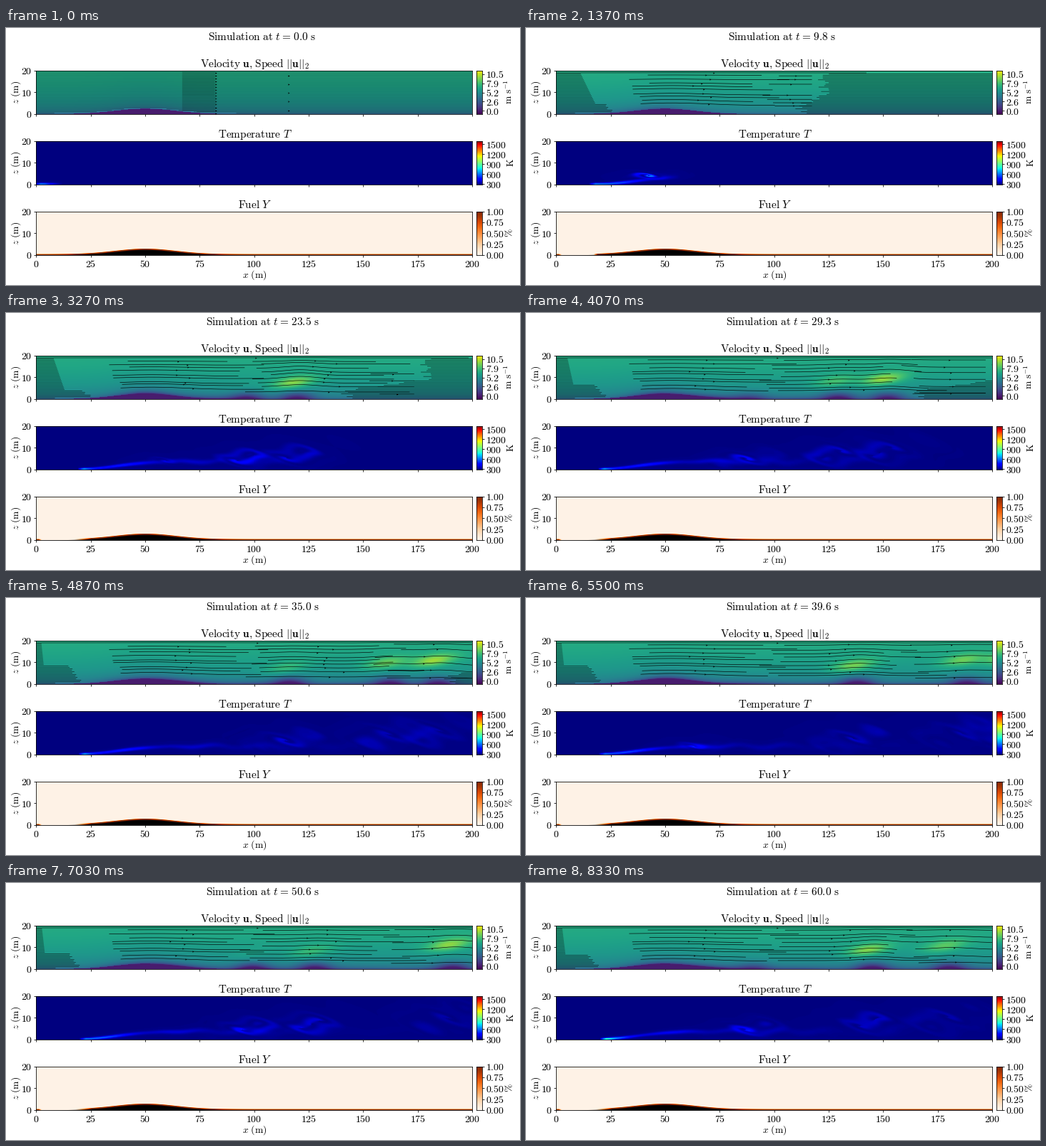
Write a matplotlib script that moves like this. It is 720 by 361 pixels and loops after 8370 ms.

```python
import matplotlib.pyplot as plt
import numpy as np
from matplotlib.animation import FuncAnimation

W, H = 720, 361
PX = 0.72                      # points per pixel at 100 dpi
STEP, FRAMES = 30, 279
PANEL_TOPS = (59.6, 158.6, 257.7)
PANEL_H = 61.1

plt.rcParams["mathtext.fontset"] = "cm"
fig = plt.figure(figsize=(7.2, 3.61), dpi=100, facecolor="white")

x = np.linspace(0, 200, 612)
z = (np.arange(62) + 0.5) * 20 / 62
X, Z = np.meshgrid(x, z)
rng = np.random.default_rng(4)


# ---------- layout ----------

def label(px, py, text, size, **kw):
    return fig.text(px / W, 1 - py / H, text, fontsize=size * PX,
                    **{"ha": "center", "va": "baseline", **kw})


def panel(left, top, width):
    ax = fig.add_axes([left / W, 1 - (top + PANEL_H) / H,
                       width / W, PANEL_H / H])
    for spine in ax.spines.values():
        spine.set_linewidth(0.8 * PX)
    ax.tick_params(length=3 * PX, width=0.8 * PX, pad=3 * PX,
                   labelsize=13.9 * PX)
    return ax


def math(values):
    return [f"${v}$" for v in values]


def field(top, cmap, lo, hi, ticks, title, last=False):
    """One map with its colour bar; returns the axes and image."""
    ax = panel(42.3, top, 610.6)
    img = ax.imshow(np.zeros_like(X), extent=(0, 200, 0, 20), origin="lower",
                    aspect="auto", cmap=cmap, vmin=lo, vmax=hi,
                    interpolation="nearest")
    ax.set_xticks(range(0, 201, 25),
                  math(range(0, 201, 25)) if last else [""] * 9)
    ax.set_yticks([0, 10, 20], math([0, 10, 20]))
    label(348.5, top - 4.8, title, 15.3)
    label(14.5, top + 30.5, r"$z\ \mathrm{(m)}$", 13.7,
          rotation=90, va="center")

    bar = panel(659.3, top, 7.2)
    bar.imshow(np.linspace(0, 1, 256)[:, None], extent=(0, 1, lo, hi),
               origin="lower", aspect="auto", cmap=cmap)
    bar.set_xticks([])
    bar.yaxis.tick_right()
    bar.set_yticks([float(v) for v in ticks], math(ticks))
    return ax, img


vel_ax, vel_img = field(
    PANEL_TOPS[0], "viridis", -0.95, 11.6,
    ["0.0", "2.6", "5.2", "7.9", "10.5"],
    r"$\mathrm{Velocity}\ \mathbf{u}{,}\ \mathrm{Speed}\ ||\mathbf{u}||_2$")
_, temp_img = field(
    PANEL_TOPS[1], "jet", 287, 1600, ["300", "600", "900", "1200", "1500"],
    r"$\mathrm{Temperature}\ T$")
fuel_ax, fuel_img = field(
    PANEL_TOPS[2], "Oranges", 0, 1, ["0.00", "0.25", "0.50", "0.75", "1.00"],
    r"$\mathrm{Fuel}\ Y$", last=True)

label(348, 351, r"$x\ \mathrm{(m)}$", 13.7)
for px, top, unit in zip((704, 707, 705), PANEL_TOPS,
                         (r"$\mathrm{m\ s}^{-1}$", r"$\mathrm{K}$", r"$\%$")):
    label(px, top + 30.5, unit, 13.5, rotation=90, va="center")
clock = label(359, 17.3, "", 15.3)


# ---------- flow model ----------

def ramp(v, start, width):
    return np.clip((v - start) / width, 0, 1)


def bell(v, mid, width):
    return np.exp(-((v - mid) / width) ** 2)


def hill(v):
    return 2.45 * np.exp(-(v - 50) ** 2 / (2 * 14 ** 2))


HX = hill(x)
DEPTH = Z - HX
fuel_ax.fill_between(x, HX, color="black", lw=0)
BASE = 6.8 * (np.maximum(DEPTH, 0.05) / 20) ** 0.16
SHEAR = np.exp(-np.maximum(DEPTH, 0) / 1.3)
FUEL = np.clip((HX + 0.45 - Z) / (20 / 62) + 0.5, 0, 1)
PLUME = 0.3 + 3.5 * (1 - bell(np.maximum(x, 20), 20, 24))

# time at x = 100, drift speed, place of birth, jet strength
PUFFS = [(20.3, 5.6, 20, 1.9), (24.4, 5.7, 55, 0.8), (32.0, 4.8, 55, 1.0),
         (46.0, 5.6, 55, 0.7), (51.2, 4.9, 55, 1.0), (62.3, 5.0, 55, 1.0)]


def puffs(t):
    """Position, height, heat and jet strength of each live puff."""
    for t100, speed, born, gain in PUFFS:
        xp = 100 + speed * (t - t100)
        if born < xp < 225:
            yield (xp, 4 + 0.05 * max(xp - 68, 0), ramp(xp, born, 20),
                   min(1.1, gain * ramp(xp, 90, 50)))


def speed_field(t):
    wake = ramp(x, 22, 25) * ramp(8 + 5 * t - x, 0, 30)
    wake = wake * (0.35 + 0.65 * bell(x, 60, 45))
    ripple = 0.8 + 0.2 * np.sin(0.16 * x - 0.8 * t)
    v = BASE - 3.0 * SHEAR * wake * ripple
    for xp, zp, _, jet in puffs(t):
        mid = zp + 1 + 0.14 * (X - xp)
        v += 3.3 * jet * bell(x, xp, 10) * bell(Z, mid, 2.7)
        dip = 4 * ramp(xp, 75, 25)
        v -= dip * np.outer(bell(z, 0, 3.2), bell(x, xp + 2, 8))
    return np.where(DEPTH < 0, 0, np.maximum(v, 0))


def temperature(t):
    foot = np.interp(t, [0, 3, 9.8, 23.5, 60], [0, 6, 16, 20, 21])
    far = np.maximum(x - foot, 0)
    heat = 420 * np.exp(-far / 6) + 280 * np.exp(-far / 40)
    heat *= ramp(x, foot - 1, 3) * ramp(12 + 4.6 * t - x, 0, 8)
    heat *= 0.65 + 0.35 * ramp(t, 0, 5)
    heat *= 0.8 + 0.25 * np.sin(0.2 * x - 1.1 * t)
    mid = PLUME + 0.7 * np.sin(0.28 * x - 1.5 * t) * ramp(x, 55, 30)
    T = 292 + heat * bell(Z, mid, 0.45 + 0.012 * far)
    bend = 0.35 * np.sin(0.23 * X + 0.5 * Z - 1.2 * t)
    for xp, zp, k, _ in puffs(t):
        a = (X - xp) / (7 + 0.06 * max(xp - 40, 0)) + bend
        b = (Z - zp) / (1.2 + 0.03 * max(xp - 40, 0)) + 1.3 * bend
        r = np.hypot(a, b)
        swirl = 0.55 + 0.45 * np.cos(5 * r - np.arctan2(b, a) + 0.4 * t)
        T += k * (30 + 110 * np.exp((100 - xp) / 50)) * np.exp(-r * r) * swirl
    return T


def fuel(t):
    front = np.interp(t, [0, 3, 9.8, 60], [-2, 7, 17, 18])
    left = ramp(x, front, np.interp(t, [0, 9.8, 23.5], [1, 2, 8]))
    unburnt = np.maximum(left, ramp(2.5 - x, 0, 1.5))
    return np.maximum(FUEL * unburnt, 0.02)


# ---------- streamlines ----------

ROWS = (np.arange(30) + 0.5) * 20 / 30
ROW_JIT = rng.uniform(-1, 1, 30)
# each block: start, end, lowest and highest z, lines
BLOCKS = [(33, 84, 4, 17.5, 9), (95, 150, 3.5, 17.5, 9),
          (158, 205, 2.5, 18, 6)]
JIT = rng.uniform(0, 1, (3, 9, 3))

style = dict(color="black", solid_capstyle="butt")
comb, = vel_ax.plot([], [], lw=0.55 * PX, snap=False, **style)
waves, = vel_ax.plot([], [], lw=0.62 * PX, snap=False, **style)
heads, = vel_ax.plot([], [], ls="", marker=">", ms=2.2 * PX, mew=0,
                     color="black")
vel_ax.set(xlim=(0, 200), ylim=(0, 20))


def lift(xs, z0, t):
    """Height of a streamline that enters at z0."""
    dz = 1.5 * bell(xs, 53, 22) * np.exp(-z0 / 13) * ramp(20 - z0, 0, 6)
    for xp, _, _, jet in puffs(t):
        dz = dz + 1.2 * jet * bell(xs, xp + 3, 11) * np.sin(np.pi * z0 / 20)
    return z0 + dz


def comb_lines(t, right):
    edge = np.interp(t, [0, 3, 9.8, 23.5, 35, 60], [82, 30, 14, 10, 3, 3.5])
    step = np.interp(t, [0, 9.8, 23.5, 35, 60], [0, 5, 4, 9, 6.5])
    extra = np.interp(t, [0, 9.8, 35, 60], [0, 4, 11, 10])
    notch = np.interp(t, [0, 9.8, 23.5], [0, 10, 36])
    xs, zs = [], []
    for row, jit in zip(ROWS, ROW_JIT):
        if t > 0 and row > 18.8:
            continue
        end, start = edge, right
        if t > 0:
            end = edge * (0.75 + 0.7 * (1 - row / 20))
            if row < step:
                end += extra * (1.5 - 0.5 * row / step) + jit
            start += 3 * jit - notch * ramp(9 - row, 0, 5)
        for a, b in ((0, end), (start, 200)):
            if b > a:
                line = np.linspace(a, b, 60)
                xs += [line, [np.nan]]
                zs += [np.where(row > hill(line) + 0.3, row, np.nan), [np.nan]]
    return np.concatenate(xs), np.concatenate(zs)


def wave_lines(t, right):
    xs, zs, tips = [np.array([])], [np.array([])], []
    if t == 0:
        tips = [(82.3, r) for r in ROWS[::2]] + [(116, r) for r in ROWS[2::6]]
        return xs[0], zs[0], tips
    left = np.interp(t, [0, 3, 9.8], [67, 38, 26])
    spans = [(0, min(right + 20, 200), 18.9)]
    for i, (x0, x1, lo, hi, n) in enumerate(BLOCKS):
        for j, z0 in enumerate(np.linspace(lo, hi, n)):
            a, b, c = JIT[i, j]
            drift = np.sin(0.6 * t + 7 * c)
            start = max(x0 + 11 * a + 3 * i * drift, left + 6 * a)
            end = min(x1 + 26 * b + 4 * drift, right - 5)
            if end - start > 12:
                spans.append((start, min(end, 200), z0 + 0.35 * drift))
    for a, b, z0 in spans:
        line = np.linspace(a, b, 70)
        zz = lift(line, z0, t)
        xs += [line, [np.nan]]
        zs += [np.where(zz > hill(line) + 0.4, zz, np.nan), [np.nan]]
        tips.append((line[35], zz[35]))
    return np.concatenate(xs), np.concatenate(zs), tips


def update(k):
    n = min(250, int((STEP * k + 25) * 0.03))
    t = 0.24 * n
    clock.set_text(r"$\mathrm{Simulation\ at}\ t\hspace{0.08}=\hspace{0.08}"
                   rf"{t:.1f}\ \mathrm{{s}}$")
    vel_img.set_data(speed_field(t))
    temp_img.set_data(temperature(t))
    fuel_img.set_data(fuel(t))
    right = 82 + 4.1 * t if t else 67
    comb.set_data(*comb_lines(t, right))
    comb.set_alpha(0.9 if t else 0.6)
    xs, zs, tips = wave_lines(t, right)
    waves.set_data(xs, zs)
    heads.set_data(*zip(*tips))
    return clock, vel_img, temp_img, fuel_img, comb, waves, heads


anim = FuncAnimation(fig, update, frames=FRAMES, interval=STEP, repeat=True,
                     repeat_delay=0, blit=False)
plt.show()
```
